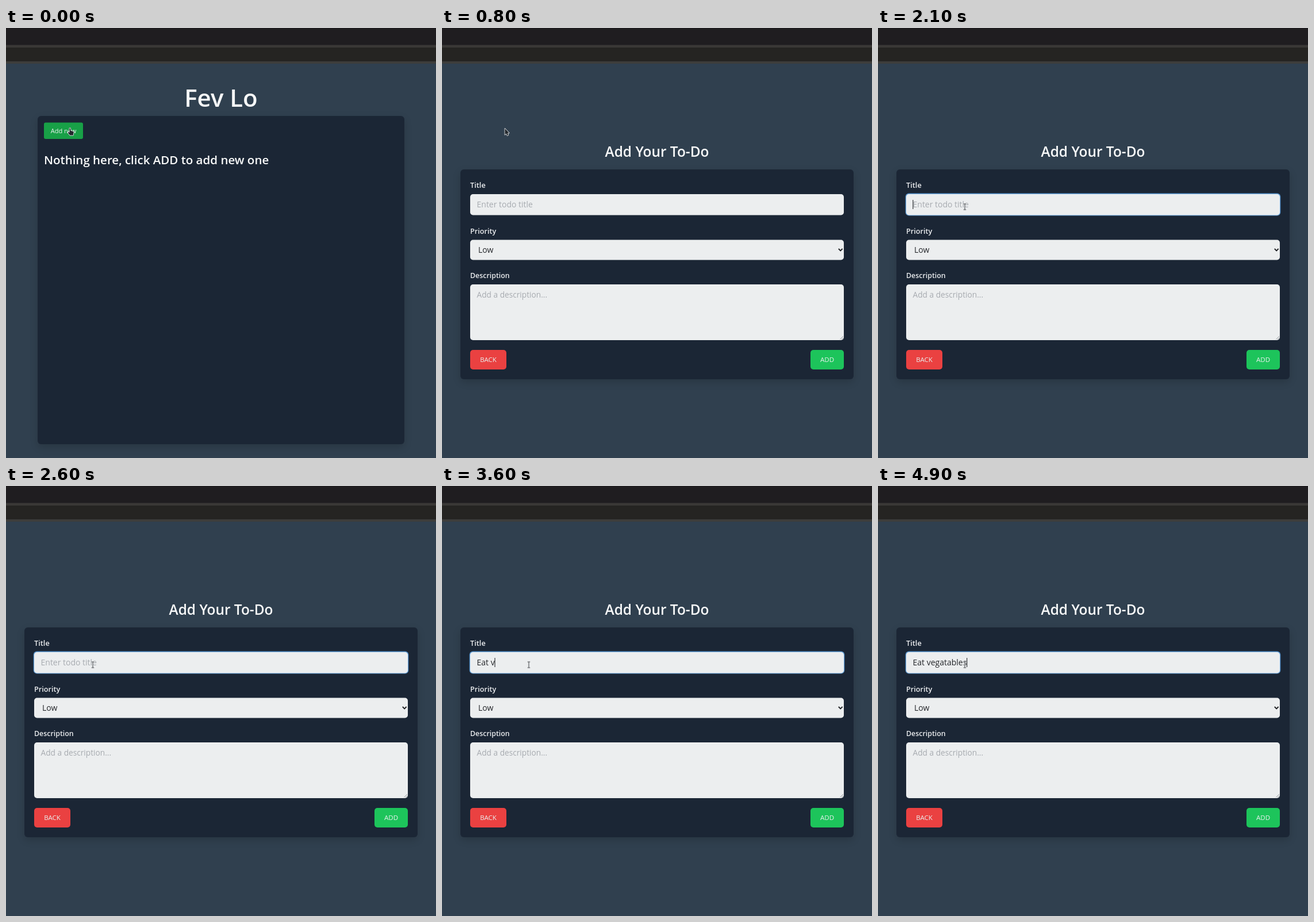
Recreate the animation shown at these times as an HTML page with a canvas. Size 748 by 748 pixels, loop 5 s.

```html
<!DOCTYPE html>
<html lang="en">
<head>
<meta charset="utf-8">
<title>To-do form</title>
<style>
  html, body { margin: 0; width: 100%; height: 100%; overflow: hidden; background: #30404f; }
  canvas { display: block; width: 748px; height: 748px; }
</style>
</head>
<body>
<canvas id="stage" width="748" height="748"></canvas>
<script>
const ctx = document.getElementById('stage').getContext('2d');
const LOOP = 5000, STEP = 100;
const FORM_AT = 800, FOCUS_AT = 1900, TYPE_AT = 3000, KEY_MS = 136;
const TYPED = 'Eat vegatables';
const FAMILY = '"Open Sans", "Noto Sans", sans-serif';
const PANEL = '#1b2635', FIELD = '#eceeef', INK = '#24262a', HINT = '#a7abb0', WHITE = '#f8f9f9';

function box(x, y, w, h, r, fill) {
  ctx.beginPath();
  ctx.roundRect(x, y, w, h, r);
  ctx.fillStyle = fill;
  ctx.fill();
}

function text(str, x, y, size, color, weight = 400, align = 'left') {
  ctx.font = `${weight} ${size}px ${FAMILY}`;
  ctx.textAlign = align;
  ctx.fillStyle = color;
  ctx.fillText(str, x, y);
}

function shape(points, x, y) {
  ctx.beginPath();
  points.forEach(([px, py]) => ctx.lineTo(x + px, y + py));
  ctx.closePath();
  ctx.lineJoin = 'round';
  ctx.lineWidth = 1.8;
  ctx.strokeStyle = '#d5d8da';
  ctx.stroke();
  ctx.fillStyle = '#22272c';
  ctx.fill();
}

function line(color, width, ...points) {
  ctx.beginPath();
  points.forEach(([x, y]) => ctx.lineTo(x, y));
  ctx.strokeStyle = color;
  ctx.lineWidth = width;
  ctx.lineJoin = 'miter';
  ctx.stroke();
}

function panel(x, y, w, h) {
  ctx.save();
  ctx.shadowColor = 'rgba(0,0,0,0.16)';
  ctx.shadowBlur = 14;
  ctx.shadowOffsetY = 5;
  box(x, y, w, h, 6, PANEL);
  ctx.restore();
}

function button(label, x, y, w, h, r, fill, size, baseline) {
  box(x, y, w, h, r, fill);
  text(label, x + w / 2, baseline, size, '#e9f0ee', 400, 'center');
}

function drawBrowser() {
  ctx.fillStyle = '#30404f';
  ctx.fillRect(0, 0, 748, 748);
  const bands = [[0, 1, '#171519'], [1, 29, '#1f1d20'], [29.5, 4.5, '#3a3836'],
                 [34, 24.5, '#252422'], [58, 4, '#3d3d3c']];
  for (const [y, h, color] of bands) {
    ctx.fillStyle = color;
    ctx.fillRect(0, y, 748, h);
  }
}

function drawList() {
  text('Fev Lo', 374, 136.5, 42, WHITE, 600, 'center');
  panel(55, 153, 638, 571);
  button('Add new', 66, 164.5, 68, 28.5, 3, '#18a047', 11, 183);
  text('Nothing here, click ADD to add new one', 66, 237, 20.5, WHITE, 600);
}

function drawTitleField(t) {
  const focused = t >= FOCUS_AT;
  if (focused) box(47.7, 287.5, 652.6, 39, 6, '#5f9bd3');
  box(49, 289, 650, 36.5, 5, FIELD);

  const count = t < TYPE_AT ? 0 : Math.min(TYPED.length, 1 + Math.floor((t - TYPE_AT) / KEY_MS));
  const value = TYPED.slice(0, count);
  if (count) text(value, 60.5, 312, 14, INK);
  else text('Enter todo title', 60.5, 312, 14, HINT);

  const caretOn = count > 0 || Math.floor((t - FOCUS_AT) / 500) % 2 === 0;
  if (focused && caretOn) {
    ctx.fillStyle = INK;
    ctx.fillRect(60.3 + (count ? ctx.measureText(value).width : 0), 299, 1.1, 16);
  }
}

function drawForm(t) {
  text('Add Your To-Do', 374, 223.5, 24.4, WHITE, 600, 'center');
  panel(32, 246, 684, 365);

  text('Title', 49, 277.5, 12.8, '#eceef0', 600);
  drawTitleField(t);

  text('Priority', 49, 357.5, 12.7, '#eceef0', 600);
  box(49, 368.5, 650, 35, 5, FIELD);
  text('Low', 63, 391, 14, INK);
  line('#1d1f22', 1.8, [689.8, 384], [693.2, 387.4], [696.6, 384]);

  text('Description', 49, 435, 12.4, '#eceef0', 600);
  box(49, 446, 650, 97, 5, FIELD);
  text('Add a description...', 60.5, 469, 13.7, HINT);
  line('#85898d', 0.8, [692.5, 541.5], [698, 536]);
  line('#85898d', 0.8, [695.5, 541.5], [698, 539]);

  button('BACK', 49, 560, 63, 34, 5, '#ea4141', 11.5, 581);
  button('ADD', 641, 560, 58, 34, 5, '#1dc45b', 11.5, 581);
}

function drawArrow(x, y) {
  shape([[0, 0], [0, 10.5], [2.4, 8.4], [4, 12], [5.8, 11.2], [4.3, 7.8], [7.2, 7.5]], x, y);
}

function drawHand(x, y) {
  shape([[0, 0], [1.6, 0], [1.9, 4.3], [6.5, 5.4], [7, 6.5], [6.3, 12],
         [0.8, 12], [-2.8, 7.4], [-2, 6.4], [0, 7.5]], x, y);
}

function drawBeam(x, y) {
  const stroke = (color, width) => {
    line(color, width, [x - 2.2, y - 5], [x + 2.2, y - 5]);
    line(color, width, [x, y - 5], [x, y + 5]);
    line(color, width, [x - 2.2, y + 5], [x + 2.2, y + 5]);
  };
  stroke('#d9dbdc', 2.6);
  stroke('#6c6f72', 1.2);
}

function drawCursor(t) {
  if (t < 300) return drawHand(110.5, 174.5);
  const u = Math.min(1, Math.max(0, (t - 900) / 700));
  const ease = u * u * (3 - 2 * u);
  const x = 109.5 + 41.5 * ease, y = 175 + 136 * ease;
  if (y > 289) drawBeam(x, y);
  else drawArrow(x, y);
}

function frame(now) {
  const t = Math.floor((now % LOOP) / STEP) * STEP;
  drawBrowser();
  if (t < FORM_AT) drawList();
  else drawForm(t);
  drawCursor(t);
  requestAnimationFrame(() => frame(performance.now()));
}
frame(performance.now());
</script>
</body>
</html>
```
